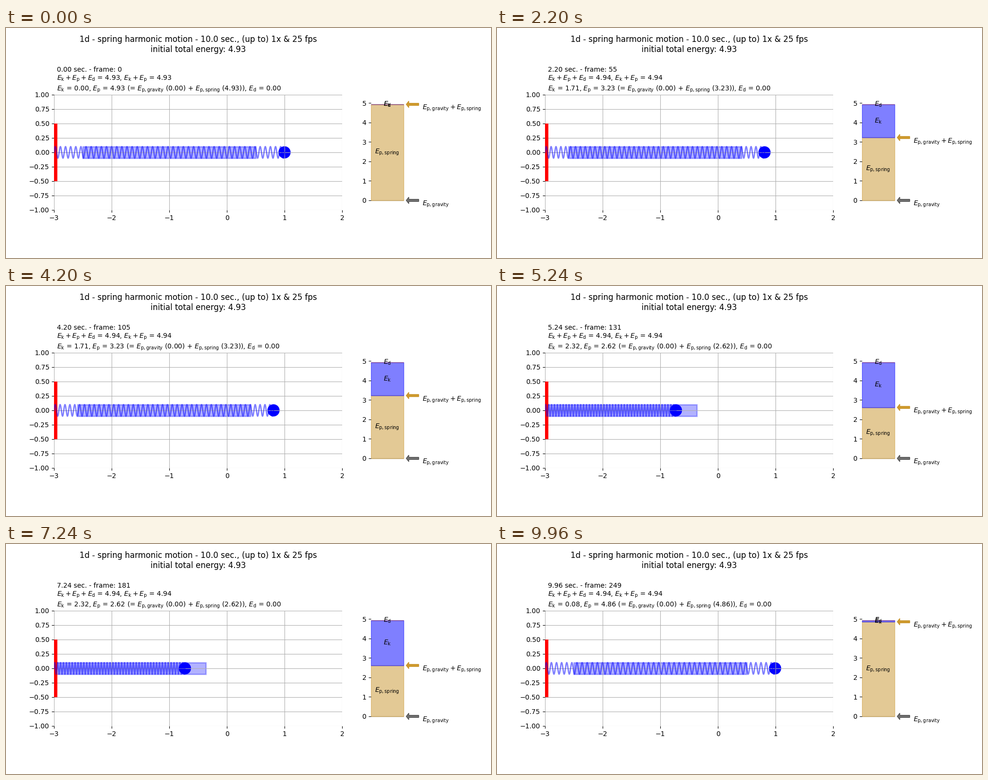
Animation, 1010 px wide and 479 px high, one loop 10 s. Source, as a matplotlib script:

```python
import numpy as np
import matplotlib.pyplot as plt
from matplotlib.animation import FuncAnimation
from matplotlib.patches import Circle, Polygon, Rectangle

plt.rcParams["font.family"] = "DejaVu Sans"

WIDTH, HEIGHT, DPI = 1010, 479, 100
FPS, SECONDS = 25, 10
OMEGA = np.pi
ENERGY = OMEGA**2 / 2
WALL_X, REST_LENGTH, COILS = -3, 3, 45
GOLD, GRAY = "#c9952d", "#737373"
PX = 1.2 * ENERGY / 240  # energy per pixel of the bar chart

fig = plt.figure(figsize=(WIDTH / DPI, HEIGHT / DPI), dpi=DPI, facecolor="white")


def pixel_axes(left, bottom, width, height):
    ax = fig.add_axes([left / WIDTH, bottom / HEIGHT, width / WIDTH, height / HEIGHT])
    ax.patch.set_visible(False)
    for spine in ax.spines.values():
        spine.set_visible(False)
    return ax


def pixel_text(x, y, text="", **kwargs):
    return fig.text(x / WIDTH, 1 - y / HEIGHT, text, **kwargs)


def symbol(name):
    return rf"$E_{{\mathrm{{{name}}}}}$"


E_K, E_P, E_D = symbol("k"), symbol("p"), symbol("d")
E_GRAVITY, E_SPRING = symbol("p,gravity"), symbol("p,spring")

# Headings
pixel_text(400, 29, "1d - spring harmonic motion - 10.0 sec., (up to) 1x & 25 fps",
           fontsize=12, ha="center")
pixel_text(400, 50, f"initial total energy: {ENERGY:.2f}", fontsize=12, ha="center")
info = [pixel_text(106, y, fontsize=10) for y in (91, 109, 131)]

# Spring scene
scene = pixel_axes(100, 100, 600, 240)
scene.set(xlim=(-3, 2), ylim=(-1, 1), xticks=range(-3, 3),
          yticks=np.linspace(-1, 1, 9))
scene.grid(True)
scene.vlines(WALL_X, -0.5, 0.5, color="red", lw=10)
rest_box = scene.add_patch(Rectangle((-2.5, -0.1), REST_LENGTH, 0.2,
                                     color="blue", alpha=0.3, lw=2))
ball = scene.add_patch(Circle((1, 0), 0.1, color="blue"))
along = np.linspace(0, 1, 1801)
coil, = scene.plot(along, 0.1 * np.sin(2 * np.pi * COILS * along),
                   color="blue", alpha=0.5, lw=2)

# Energy bars, with one x unit per pixel
chart = pixel_axes(760, 100, 240, 240)
chart.set(xlim=(0, 240), ylim=(-0.1 * ENERGY, 1.1 * ENERGY),
          xticks=[], yticks=range(6))


def energy_bar(color, label):
    bar = chart.add_patch(Rectangle((0, 0), 67.5, 0, color=color, alpha=0.5, lw=1))
    text = chart.text(33.75, 0, label, ha="center", va="center", zorder=5)
    return bar, text


def set_bar(bar, bottom, height):
    patch, text = bar
    patch.set_y(bottom)
    patch.set_height(height)
    text.set_y(bottom + height / 2)


gravity_bar = energy_bar(GRAY, "")
spring_bar = energy_bar(GOLD, E_SPRING)
kinetic_bar = energy_bar("blue", E_K)
damped_bar = energy_bar("brown", E_D)

ARROW = np.array([(73.5, 0), (78.8, 6.8), (78.8, 2.3), (99.5, 2.3),
                  (99.5, -2.3), (78.8, -2.3), (78.8, -6.8)])


def arrow_points(level):
    return ARROW * (1, PX) + (0, level)


def level_arrow(face, edge, label):
    arrow = chart.add_patch(Polygon(arrow_points(0), closed=True, fc=face, ec=edge,
                                    lw=1, zorder=3, clip_on=False))
    return arrow, chart.text(107, -11 * PX, label)


def set_arrow(marker, level):
    arrow, text = marker
    arrow.set_xy(arrow_points(level))
    text.set_y(level - 11 * PX)


level_arrow(GRAY, "#505050", E_GRAVITY)
potential_marker = level_arrow("#cf9b2d", "#c9952d",
                               r"$E_{\mathrm{p,gravity}}+E_{\mathrm{p,spring}}$")


def update(frame):
    t = frame / FPS
    # Slight phase lead and energy growth of the numerical integration
    phase = OMEGA * t * (1 + 5e-5)
    total = ENERGY + 3e-4 * t
    x = np.cos(phase)
    spring, kinetic = total * x**2, total * np.sin(phase)**2

    ball.center = (x, 0)
    coil.set_xdata(WALL_X + along * (x - WALL_X))
    rest_box.set_x((WALL_X + x - REST_LENGTH) / 2)

    set_bar(spring_bar, 0, spring)
    set_bar(kinetic_bar, spring, kinetic)
    set_bar(damped_bar, total, 0)
    set_arrow(potential_marker, spring)

    info[0].set_text(f"{t:.2f} sec. - frame: {frame}")
    info[1].set_text(r"$E_{\mathrm{k}}+E_{\mathrm{p}}+E_{\mathrm{d}}$"
                     f" = {total:.2f}, "
                     r"$E_{\mathrm{k}}+E_{\mathrm{p}}$"
                     f" = {total:.2f}")
    info[2].set_text(f"{E_K} = {kinetic:.2f}, {E_P} = {spring:.2f} "
                     f"(= {E_GRAVITY} (0.00) + {E_SPRING} ({spring:.2f})), "
                     f"{E_D} = 0.00")
    return []


anim = FuncAnimation(fig, update, frames=FPS * SECONDS, interval=1000 / FPS,
                     init_func=lambda: update(0), repeat=True, repeat_delay=0)
plt.show()
```
